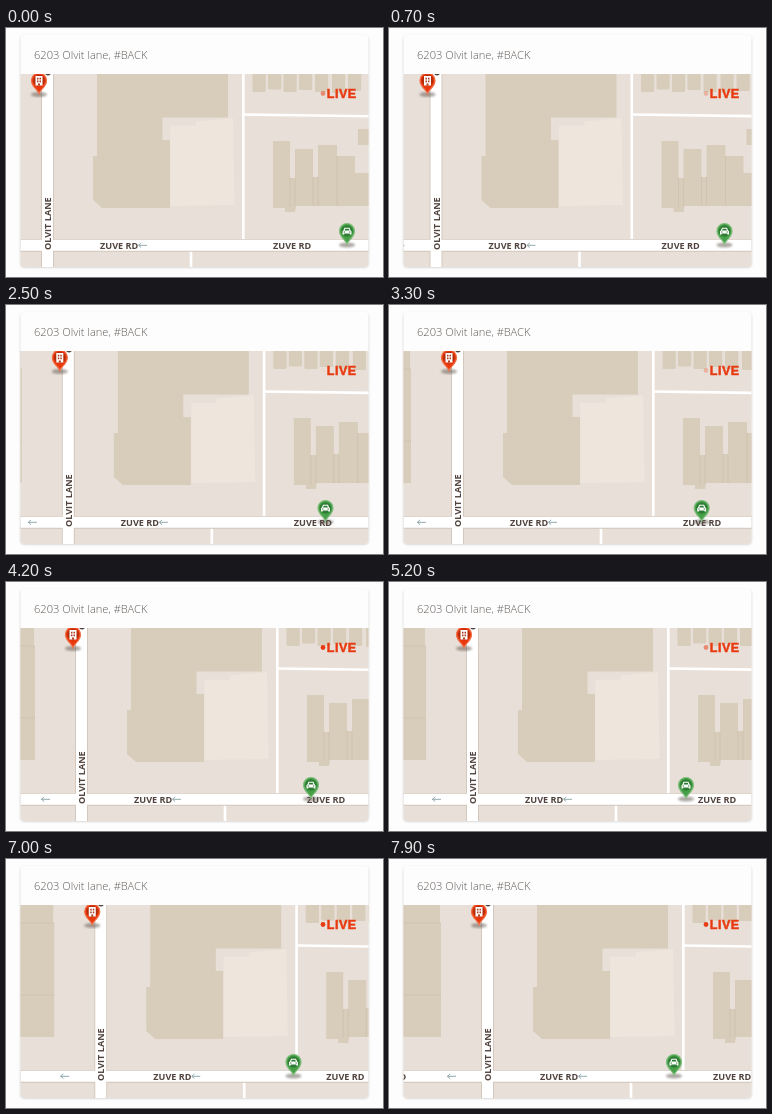
Write an HTML page that moves like this. It is 377 by 249 pixels and loops after 8000 ms.

```html
<!DOCTYPE html>
<html lang="en">
<head>
<meta charset="utf-8">
<title>Live pickup map</title>
<style>
html, body { margin: 0; width: 100%; height: 100%; overflow: hidden; background: #fdfdfd; }
svg { display: block; }
.address { font: 300 11.1px "Open Sans", sans-serif; fill: #5f5955; }
.street { font: 700 9.1px "Open Sans", sans-serif; fill: #51433e; stroke: #fff; stroke-width: 1.6; paint-order: stroke; }
.live { font: 700 12.5px "Liberation Sans", Arial, sans-serif; letter-spacing: .5px; stroke: #e83a10; stroke-width: .5; }
.accent { fill: #e83a10; }
.building { fill: #d8ccba; }
.edge { fill: none; stroke: #cdc0ad; stroke-width: .7; }
.arrow { fill: none; stroke: #93a9ad; stroke-width: 1; }
</style>
</head>
<body>
<svg width="377" height="249" viewBox="0 0 377 249">
  <defs>
    <filter id="soft" x="-10%" y="-10%" width="120%" height="120%"><feGaussianBlur stdDeviation="1.1"/></filter>
    <clipPath id="window"><path d="M14.5 46H362.5V235a4 4 0 0 1-4 4H18.5a4 4 0 0 1-4-4Z"/></clipPath>
    <g id="arrow" class="arrow"><path d="M0 0H9M3.2-2.3L.5 0L3.2 2.3"/></g>
    <path id="pin" d="M0 12.500C-1.200 8.500-7.500 6-7.500-.5A7.500 7.500 0 0 1 7.500-.5C7.500 6 1.200 8.500 0 12.500Z"/>
    <ellipse id="pinShadow" cy="13.500" rx="8" ry="2.600" fill="#5b5148" opacity=".5" filter="url(#soft)"/>
  </defs>

  <rect x="14.500" y="8" width="348" height="231.500" rx="4" fill="#000" opacity=".2" filter="url(#soft)"/>
  <rect x="14.500" y="7" width="348" height="232" rx="4" fill="#fdfdfd"/>
  <text class="address" x="28" y="30.500">6203 Olvit lane, #BACK</text>

  <g clip-path="url(#window)">
    <rect x="14" y="46" width="349" height="194" fill="#e8dfd8"/>
    <g id="map">
      <path class="building" d="M-70 40H-6V64H-5V178H-70Z"/>
      <path class="edge" d="M-70 64H-5M-70 136H-5"/>
      <path class="building" d="M91 40H222V89.500H156.500V112H164V180H96L87 172V128H91Z"/>
      <path d="M164.500 97.500H190V93.500L227 90L228.500 177L164.500 178Z" fill="#eee6dd"/>
      <g id="sheds" class="building"></g>
      <path class="building" d="M267 113H284V150H289V121H307V149H312V117H331V128H349V145H366V178H290L289 184H279V180H267Z"/>
      <path class="building" d="M352 101H366V117H352Z"/>
      <path class="edge" d="M284 150V179M289 150V178M307 149V178M312 149V178M331 128V178"/>
      <g fill="none" stroke="#fff">
        <path d="M237.300 40V212M185 223V245" stroke-width="2.600"/>
        <path d="M237 86.500L363 88.200" stroke-width="2.600"/>
        <path d="M-90 217.300H400M41.500 40V245" stroke="#d2c6bb" stroke-width="12.800"/>
        <path d="M-90 217.300H400M41.500 40V245" stroke-width="11"/>
      </g>
      <use href="#arrow" x="1" y="217.300"/>
      <use href="#arrow" x="132" y="217.300"/>
      <g id="labels" class="street"></g>
      <g transform="translate(33 53)">
        <use href="#pinShadow"/>
        <use href="#pin" fill="#e8380c" stroke="#f0704a" stroke-width="1.200"/>
        <circle cy="-.5" r="5.800" fill="#b32c0b"/>
        <path d="M-3.500-5H3.500V4.500H-3.500Z" fill="#fff"/>
        <path d="M-2-3.200H-.5V-1.500H-2ZM.5-3.200H2V-1.500H.5ZM-2-.4H-.5V1.300H-2ZM.5-.4H2V1.300H.5ZM-1 2.500H1V4.500H-1Z" fill="#ae3b20"/>
      </g>
    </g>
    <g id="car">
      <use href="#pinShadow"/>
      <use href="#pin" fill="#46a047" stroke="#83bd80" stroke-width="1.200"/>
      <circle cy="-.5" r="5.800" fill="#2f7d34"/>
      <path d="M-4.500 3V-.3L-3.600-1L-2.500-3.800H2.500L3.600-1L4.500-.3V3H2.800V2H-2.800V3Z" fill="#fff"/>
      <path d="M-2.400-1.100L-1.800-2.700H1.800L2.400-1.100ZM-3.400.1H-2V1.100H-3.400ZM2 .1H3.400V1.100H2Z" fill="#2f7d34"/>
    </g>
    <circle id="dot" class="accent" cx="317" cy="65.500" r="2.400"/>
    <text class="live accent" x="320.800" y="70">LIVE</text>
  </g>
</svg>
<script>
const LOOP = 8000, STEP = 100, PULSE = 1300;
const times = [0, 1400, 2500, 4200, 5200, 6100, 7900];
const mapShift = [0, 11, 20.8, 34, 42, 49.5, 57];
const carX = [341, 330, 319.5, 305, 297, 290, 285];
const byId = id => document.getElementById(id);

function add(parent, tag, attrs, text = "") {
  const node = document.createElementNS("http://www.w3.org/2000/svg", tag);
  for (const key in attrs) node.setAttribute(key, attrs[key]);
  node.textContent = text;
  byId(parent).append(node);
}

[[246.5, 64], [262, 61.5], [277.5, 64], [293, 62], [309, 64], [326, 65], [342, 63]].forEach(([x, bottom]) =>
  add("sheds", "rect", { x, y: 40, width: 13.2, height: bottom - 40, rx: 1.5 }));

for (const x of [-78, 94, 267]) add("labels", "text", { x, y: 220.7 }, "ZUVE RD");
for (const y of [48, 222]) add("labels", "text", { transform: `translate(45 ${y}) rotate(-90)` }, "OLVIT LANE");

function valueAt(values, t) {
  let i = 0;
  while (i < times.length - 2 && t > times[i + 1]) i++;
  const part = Math.min(1, (t - times[i]) / (times[i + 1] - times[i]));
  return values[i] + (values[i + 1] - values[i]) * part;
}

function draw(t) {
  byId("map").setAttribute("transform", `translate(${valueAt(mapShift, t)} 0)`);
  byId("car").setAttribute("transform", `translate(${valueAt(carX, t)} 203.5)`);
  const glow = .5 + Math.sin(2 * Math.PI * t / PULSE);
  byId("dot").setAttribute("opacity", Math.max(0, Math.min(1, glow)));
}

const start = performance.now();
function tick() {
  const t = (performance.now() - start) % LOOP;
  draw(Math.floor(t / STEP) * STEP);
  requestAnimationFrame(tick);
}
tick();
</script>
</body>
</html>
```
